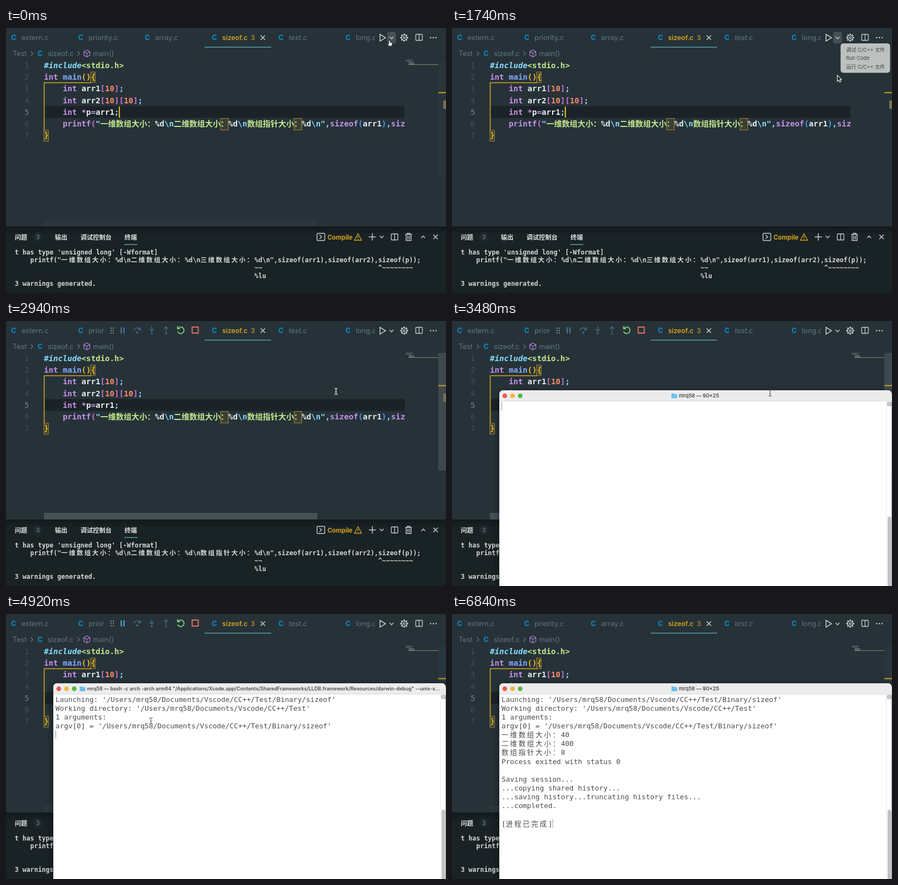
Write an HTML page with a canvas that moves like this. It is 800x482 px and loops after 6870 ms.

```html
<!DOCTYPE html>
<html lang="zh">
<head>
<meta charset="utf-8">
<title>sizeof.c</title>
<style>
html, body { margin: 0; width: 100%; height: 100%; overflow: hidden; background: #263238; }
canvas { display: block; width: 800px; height: 482px; }
</style>
</head>
<body>
<canvas id="stage" width="800" height="482"></canvas>
<script>
const ctx = document.getElementById('stage').getContext('2d');
const LOOP = 6870;
const CJK = '"Noto Sans CJK SC", "Noto Sans CJK"';
const UI = `Inter, ${CJK}, sans-serif`;
const MONO = `"DejaVu Sans Mono", ${CJK}, monospace`;
const USER = 'mrq58';
const BG = '#263238', PALE = '#c6ced1', GOLD = '#d4a31f', BLUE = '#0e84bd', TEAL = '#5d9ca6';

const T = {
  menu: 900, hover: 1950, pick: 2220, menuGone: 2410, compiled: 2640, toolbar: 2850,
  window: 3420, launch: 3660, attached: 3780, output: 6210, exit: 6390, done: 6540, toolbarGone: 6600
};

function rect(x, y, w, h, color, radius = 0) {
  ctx.fillStyle = color;
  ctx.beginPath();
  ctx.roundRect(x, y, w, h, radius);
  ctx.fill();
}

function frame(x, y, w, h, color, width = 1, radius = 0) {
  ctx.strokeStyle = color;
  ctx.lineWidth = width;
  ctx.beginPath();
  ctx.roundRect(x, y, w, h, radius);
  ctx.stroke();
}

function stroke(d, color = PALE, width = 1.3, x = 0, y = 0) {
  ctx.save();
  ctx.translate(x, y);
  ctx.strokeStyle = color;
  ctx.lineWidth = width;
  ctx.stroke(new Path2D(d));
  ctx.restore();
}

function disc(x, y, r, color) {
  ctx.fillStyle = color;
  ctx.beginPath();
  ctx.arc(x, y, r, 0, Math.PI * 2);
  ctx.fill();
}

function text(str, x, y, font, color, align = 'left') {
  ctx.font = font;
  ctx.fillStyle = color;
  ctx.textAlign = align;
  ctx.fillText(str, x, y);
  return ctx.measureText(str).width;
}

// Terminal text: wide characters take two cells
function grid(str, x, y, cell, font, color) {
  for (const ch of str) {
    text(ch, x, y, font, color);
    x += ch.charCodeAt(0) > 0x2e80 ? cell * 2 : cell;
  }
}

function chevron(x, y, color = PALE, dir = 1) {
  stroke(`M-3.5 ${-2 * dir}L0 ${1.8 * dir}L3.5 ${-2 * dir}`, color, 1.3, x, y);
}

function cross(x, y, r) { stroke(`M${-r} ${-r}L${r} ${r}M${r} ${-r}L${-r} ${r}`, PALE, 1.5, x, y); }

function splitIcon(x, y) {
  frame(x - 6, y - 5.5, 12, 11, PALE, 1.3, 1);
  stroke('M0 -5.5V5.5', PALE, 1.3, x, y);
}

function cIcon(x, y) { text('C', x, y, `800 12.5px ${UI}`, BLUE, 'center'); }

function drawTabs(t) {
  const dim = '#617783', y = 22;
  const tabs = [['extern.c', 14], ['priority.c', 136], ['array.c', 257], ['test.c', 500, 'italic '], ['long.c', 622]];
  ctx.save();
  ctx.beginPath();
  ctx.rect(0, 0, 671, 40);
  ctx.clip();
  for (const [name, x, style = ''] of tabs) {
    cIcon(x, y);
    text(name, x + 14, y, `${style}12.8px ${UI}`, dim);
  }
  ctx.restore();
  cIcon(379, y);
  text('sizeof.c', 393, y, `600 12.2px ${UI}`, GOLD);
  text('3', 445, y, `600 12px ${UI}`, '#ad8721');
  cross(467, 17.5, 4);
  rect(361, 34, 121, 1.6, TEAL);

  if (t < T.compiled) rect(693, 7, 16, 21, '#455157', 4);
  stroke('M680 11.5L690 17.8L680 24Z', PALE, 1.5);
  chevron(701, 18);
  stroke('M0 -7.2V-4.5M0 7.2V4.5M-7.2 0H-4.5M7.2 0H4.5M-5 -5L-3 -3M5 5L3 3M-5 5L-3 3M5 -5L3 -3', PALE, 2.5, 724, 17.5);
  stroke('M-4.8 0A4.8 4.8 0 1 0 4.8 0A4.8 4.8 0 1 0 -4.8 0M-1.7 0A1.7 1.7 0 1 0 1.7 0A1.7 1.7 0 1 0 -1.7 0', PALE, 1.3, 724, 17.5);
  splitIcon(751, 17);
  for (const x of [772, 777, 782]) disc(x, 17.5, 1.3, PALE);

  const crumb = `12.8px ${UI}`;
  text('Test', 12, 51, crumb, dim);
  stroke('M-2 -4L2 0L-2 4', dim, 1.2, 47, 46.5);
  cIcon(62, 51);
  text('sizeof.c', 76, 51, crumb, dim);
  stroke('M-2 -4L2 0L-2 4', dim, 1.2, 132, 46.5);
  stroke('M0 -6L5.5 -3V3.5L0 6.5L-5.5 3.5V-3ZM-5.5 -3L0 0L5.5 -3M0 0V6.5', '#a979c9', 1.3, 147, 46);
  text('main()', 158, 51, crumb, dim);
}

const C = { fg: '#e6eeee', key: '#c792ea', op: '#89ddff', str: '#c3e88d', fn: '#82aaff', num: '#f78c6c', b1: '#e8b923', b2: '#d070d0', b3: '#3a9ff0' };
const array = dims => Array(dims).fill(0).flatMap(() => [['[', 'b2'], ['10', 'num'], [']', 'b2']]);
const format = label => [[label, 'str'], ['：', 'str'], ['%d', 'fg'], ['\\n', 'op']];
const CODE = [
  [['#include', 'op', 1], ['<stdio.h>', 'str']],
  [['int', 'key'], [' main', 'fn'], ['(){', 'b1']],
  [['    int', 'key'], [' arr1', 'fg'], ...array(1), [';', 'op']],
  [['    int', 'key'], [' arr2', 'fg'], ...array(2), [';', 'op']],
  [['    int', 'key'], [' *', 'key'], ['p', 'fg'], ['=', 'key'], ['arr1', 'fg'], [';', 'op']],
  [['    printf', 'key'], ['(', 'b2'], ['"', 'op'], ...format('一维数组大小'), ...format('二维数组大小'),
    ...format('数组指针大小'), ['"', 'op'], [',', 'op'], ['sizeof', 'key'], ['(', 'b3'], ['arr1', 'fg'], [')', 'b3'],
    [',', 'op'], ['sizeof', 'key'], ['(', 'b3']],
  [['}', 'b1']]
];

function drawEditor(t) {
  rect(69, 142, 656, 21.5, '#1b2327');
  for (const [x, y, w, h] of [[154, 80, 8, 19], [69, 186, 8, 20], [390.5, 164.5, 13.5, 21], [524, 164.5, 13.5, 21]]) {
    rect(x, y, w, h, 'rgba(190,150,40,.12)');
    frame(x, y, w, h, '#a5842c', 1.2);
  }
  ctx.save();
  ctx.beginPath();
  ctx.rect(0, 50, 725, 300);
  ctx.clip();
  CODE.forEach((line, i) => {
    const y = 73 + i * 21.2;
    text(i + 1, 42, y, `13.5px ${MONO}`, i === 4 ? '#6d8794' : '#40525b', 'right');
    let x = 69;
    for (const [str, color, italic] of line) {
      x += text(str, x, y, `${italic ? 'italic ' : ''}bold 14.2px ${MONO}`, C[color]);
    }
  });
  ctx.restore();
  stroke('M155 99.5H69.5V186', GOLD, 1.6);
  const blinkOn = (t + 400) % 1000 < 500;
  if (t < T.pick && blinkOn) rect(205, 143, 2.2, 20, '#e0b32c');

  // Minimap and overview ruler
  const mini = [[727, 58, 13], [727, 60, 10], [732, 62, 9], [732, 63.5, 11], [732, 65, 10]];
  for (const [x, y, w] of mini) rect(x, y, w, 1, '#64767b');
  rect(732, 66, 54, 1, '#7f8a63');
  const bars = t < 300 ? 0.14 * (1 - t / 300)
    : t < 2550 ? 0
    : t < 3600 ? Math.min(1, (t - 2550) / 200)
    : Math.max(0.2, 1 - (t - 3600) / 800);
  ctx.globalAlpha = bars;
  rect(786, 58, 14, 214, '#3d494f');
  rect(69, 349, 497, 12, '#465258');
  ctx.globalAlpha = 1;
  rect(786, 116.5, 14, 2, '#c99f25');
  rect(795, 132, 5, 15, '#747451');
}

function drawPanel(t) {
  const shade = ctx.createLinearGradient(0, 361, 0, 376);
  shade.addColorStop(0, '#12191c');
  shade.addColorStop(1, '#192225');
  rect(0, 361, 800, 121, shade);
  const tab = `700 11.3px ${UI}`;
  [['问题', 16], ['输出', 89], ['调试控制台', 135.5], ['终端', 215.5]].forEach(([s, x]) => text(s, x, 384.5, tab, '#dfe4e5'));
  disc(58, 380, 8.5, '#1f2a2f');
  text('3', 58, 384, `10.5px ${UI}`, '#7b8b93', 'center');
  rect(215, 393, 24, 1.5, TEAL);

  frame(565.5, 373.5, 14, 13, PALE, 1.4, 1);
  stroke('M570 376.5L574 380L570 383.5', PALE, 1.4);
  text('Compile', 584.5, 384.5, `700 11.3px ${UI}`, GOLD);
  stroke('M640 374L646.5 386H633.5ZM640 378V382M640 383.2V384.6', GOLD, 1.3);
  stroke('M666 373.5V386.5M659.5 380H672.5', PALE, 1.5);
  chevron(683, 380);
  splitIcon(706.5, 380);
  stroke('M726 375.5H738M729.5 375V373.5H734.5V375M727.5 376V386.5H736.5V376M730.5 378V384.5M733.5 378V384.5', PALE, 1.4);
  chevron(758.5, 380, PALE, -1);
  cross(781, 380, 4);

  const third = t < T.compiled ? '三维数组大小' : '数组指针大小';
  const pad = ' '.repeat(62);
  [
    "t has type 'unsigned long' [-Wformat]",
    `    printf("一维数组大小：%d\\n二维数组大小：%d\\n${third}：%d\\n",sizeof(arr1),sizeof(arr2),sizeof(p));`,
    pad + '~~' + ' '.repeat(30) + '^~~~~~~~~',
    pad + '%lu',
    '3 warnings generated.'
  ].forEach((line, i) => grid(line, 16, 411.5 + i * 14.4, 7.03, `bold 11.7px ${MONO}`, '#d3d7d8'));
}

function drawDebugBar(t) {
  const dim = '#41687f';
  rect(178, 3, 181, 28, BG);
  for (let i = 0; i < 6; i++) rect(190 + i % 2 * 4, 12 + (i >> 1) * 4.2, 2, 2, '#8b989e');
  stroke('M209.5 11.5V22.5M214.5 11.5V22.5', t < T.attached ? '#497f9f' : '#59b0e8', 2);
  stroke('M232.5 17A6 6 0 0 1 243.5 15.5M244.5 11V16H239.5', dim, 1.6);
  stroke('M265 10V18M261 14.5L265 18.5L269 14.5', dim, 1.6);
  stroke('M291 20V11M287 14.5L291 10.5L295 14.5', dim, 1.6);
  disc(238.5, 21, 1.9, dim);
  disc(265, 22.3, 1.9, dim);
  disc(291, 22.8, 1.9, dim);
  stroke('M313 13A6 6 0 1 1 312 19M312 9.5V14H316.5', '#82c77c', 1.9);
  frame(338.5, 11, 11, 11, '#e0705c', 1.9);
}

function drawMenu(t) {
  const alpha = t < T.pick ? 1 : 1 - (t - T.pick) / (T.menuGone - T.pick);
  const active = t >= T.hover;
  ctx.globalAlpha = alpha * 0.96;
  rect(706.5, 28, 90, 53.5, '#c3c6c5', 5);
  ctx.globalAlpha = Math.min(1, alpha * 2);
  if (active) rect(710.5, 62.5, 82, 15.5, '#1f59a0', 3);
  ctx.globalAlpha = alpha;
  ['调试 C/C++ 文件', 'Run Code', '运行 C/C++ 文件'].forEach((item, i) =>
    text(item, 716.5, 42.5 + i * 15.7, `9.2px ${UI}`, active && i === 2 ? '#f4f6f8' : '#414546'));
  ctx.globalAlpha = 1;
}

function folder(x, y) {
  rect(x - 5, y - 4, 5, 3, '#55aede', 1);
  rect(x - 5, y - 3, 10.5, 7.5, '#6cc0ec', 1);
}

function drawWindow(t) {
  ctx.save();
  ctx.shadowColor = 'rgba(0,0,0,.5)';
  ctx.shadowBlur = 14;
  ctx.shadowOffsetY = 4;
  rect(86, 126, 713.5, 380, '#fff', 7);
  ctx.restore();
  rect(86, 126, 713.5, 20, '#ececec', [7, 7, 0, 0]);
  rect(86, 145.5, 713.5, 0.8, '#d3d3d3');
  ['#ed5b52', '#efb93f', '#54b948'].forEach((color, i) => disc(96 + i * 14, 136, 4.3, color));

  if (t < T.launch || t >= T.done) {
    folder(404, 136);
    text(`${USER} — 90×25`, 412.5, 139.3, `600 9.3px ${UI}`, '#4b4b4b');
  } else {
    folder(139, 136);
    text(`${USER} — bash -c arch -arch arm64 "/Applications/Xcode.app/Contents/SharedFrameworks/LLDB.framework/Resources/darwin-debug" --unix-s...`,
      147.5, 139.3, `600 9px ${UI}`, '#4b4b4b');
  }

  const home = `'/Users/${USER}/Documents/Vscode/CC++/Test`;
  const lines = [];
  if (t >= T.launch) lines.push(`Launching: ${home}/Binary/sizeof'`, `Working directory: ${home}'`, '1 arguments:', `argv[0] = ${home}/Binary/sizeof'`);
  if (t >= T.output) lines.push('一维数组大小：40', '二维数组大小：400', '数组指针大小：8', 'Process exited with status 0');
  if (t >= T.exit) lines.push('', 'Saving session...', '...copying shared history...', '...saving history...truncating history files...', '...completed.');
  if (t >= T.done) lines.push('', '[进程已完成]');
  const cell = 7.72, row = 16.15;
  lines.forEach((line, i) => grid(line, 90, 159.5 + i * row, cell, `12.8px ${MONO}`, '#4c4c4c'));
  const caretRow = t >= T.done ? 14 : lines.length;
  rect(t >= T.done ? 90 + cell * 12 : 90, 147.5 + caretRow * row, 1, 15, '#9b9b9b');

  rect(789.5, 146, 0.8, 336, '#e4e4e4');
  frame(792, 148, 6, 6, '#8c8c8c', 1);
  stroke('M792 150H798M792 152H798', '#8c8c8c', 0.8);
  rect(792, 356, 6.5, 140, '#c1c1c1', 3);
}

const PATH = [
  [0, 698, 22], [1050, 698, 22], [1500, 702, 60], [1740, 700.5, 86], [1950, 735, 72], [2220, 733, 71],
  [2370, 632, 115], [2640, 600, 128], [3360, 600, 128], [4080, 313, 170], [4500, 290, 178], [5790, 184, 243], [6210, 184, 243]
];

function pointerAt(t) {
  const i = PATH.findIndex(p => p[0] > t);
  const [t0, x0, y0] = PATH[i - 1], [t1, x1, y1] = PATH[i];
  const u = (t - t0) / (t1 - t0), k = u * u * (3 - 2 * u);
  return [x0 + (x1 - x0) * k, y0 + (y1 - y0) * k];
}

function drawPointer(t) {
  if (t >= T.output) return;
  const [x, y] = pointerAt(t);
  ctx.save();
  ctx.translate(x, y);
  if (t >= T.compiled) {
    const onWhite = t >= T.window && y > 126;
    const d = 'M-3 -5.5Q0 -5.5 0 -3.5Q0 -5.5 3 -5.5M0 -4V4M-3 5.5Q0 5.5 0 3.5Q0 5.5 3 5.5M-1.5 1H1.5';
    if (!onWhite) stroke(d, '#11191c', 2.6);
    stroke(d, onWhite ? '#777' : '#dfe4e5', 1.3);
  } else {
    const hand = t < 1150;
    const shape = new Path2D(hand
      ? 'M-2 0Q-1 -1 0 0.5L1 4L4 5Q5.5 6 4.5 8L3 11H-2L-5 7Q-4.5 5.5 -2.5 7Z'
      : 'M0 0V11L2.7 8.6L4.5 12.5L6.5 11.6L4.8 7.9H8Z');
    ctx.fillStyle = hand ? '#f6f6f6' : '#11181b';
    ctx.strokeStyle = hand ? '#222' : '#eef1f1';
    ctx.lineWidth = 1.1;
    ctx.fill(shape);
    ctx.stroke(shape);
  }
  ctx.restore();
}

function draw(now) {
  const t = now % LOOP;
  rect(0, 0, 800, 482, BG);
  drawTabs(t);
  drawEditor(t);
  drawPanel(t);
  if (t >= T.toolbar && t < T.toolbarGone) drawDebugBar(t);
  if (t >= T.menu && t < T.menuGone) drawMenu(t);
  if (t >= T.window) drawWindow(t);
  drawPointer(t);
}

const start = performance.now();
function tick() {
  draw(performance.now() - start);
  requestAnimationFrame(tick);
}
tick();
</script>
</body>
</html>
```
